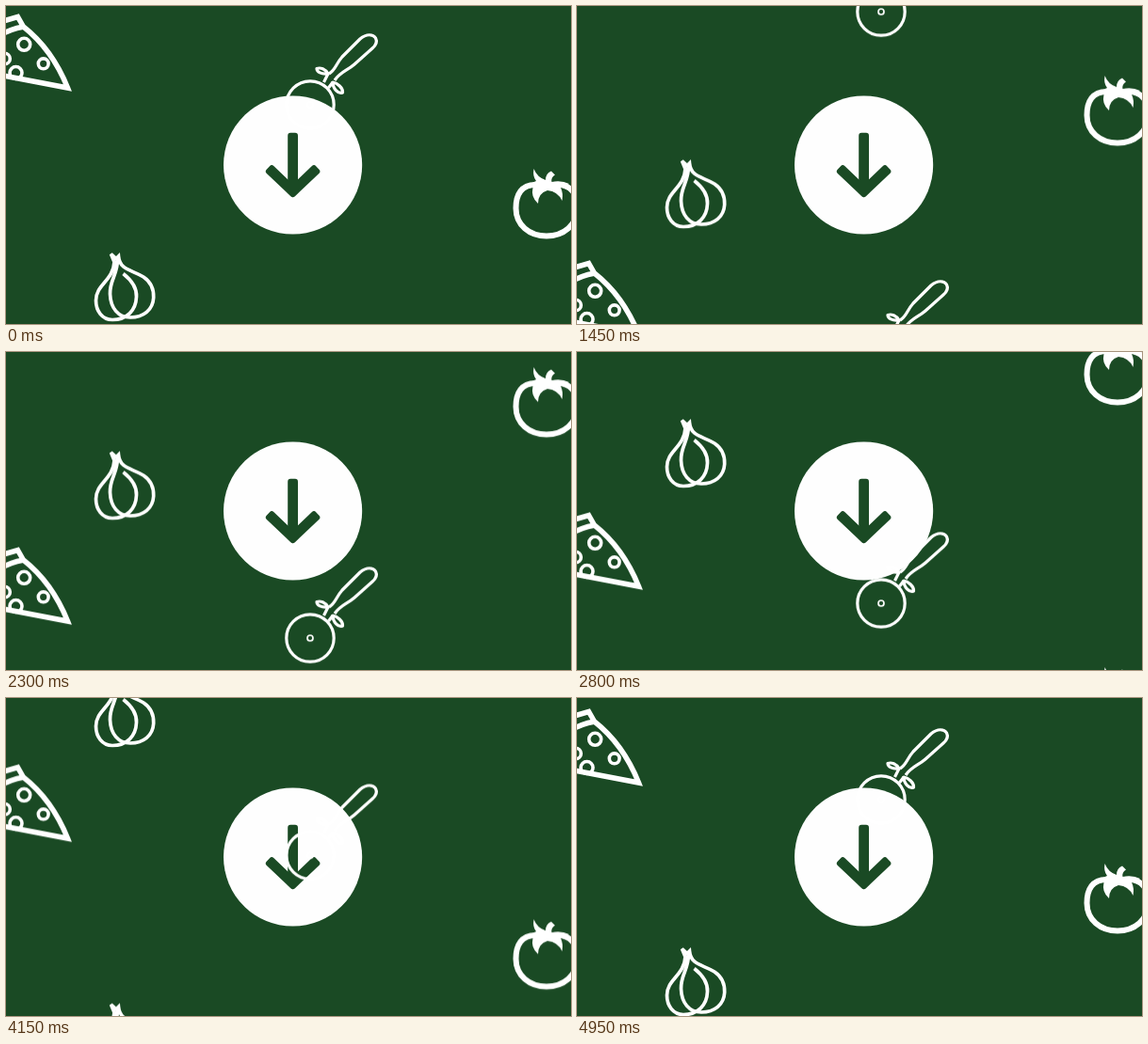
Animation, 600 px wide and 338 px high, one loop 5 s. Source, as an HTML page:

```html
<!DOCTYPE html>
<html lang="en">
<head>
<meta charset="utf-8">
<title>Scroll down</title>
<style>
  html, body { margin: 0; width: 100%; height: 100%; overflow: hidden; background: #1a4a24; }
  svg { display: block; width: 600px; height: 338px; }
  .line { fill: none; stroke: #fff; }
  .leaving { animation: leave 5s steps(100) infinite; }
  .arriving { animation: arrive 5s steps(100) infinite; }
  @keyframes leave { from { transform: translateY(0); } to { transform: translateY(-341px); } }
  @keyframes arrive { from { transform: translateY(369.3px); } to { transform: translateY(-0.7px); } }
</style>
</head>
<body>
<svg viewBox="0 0 600 338">
  <defs>
    <g id="pizza" class="line" stroke-width="5.5">
      <path d="M-8 17.500 L12.500 11.600 L18.500 22 Q49 46 65.500 87 L-8 73"/>
      <path d="M-8 32 Q4 24.500 19 22"/>
      <g stroke-width="3.6">
        <circle cx="19.200" cy="40.800" r="6.500"/>
        <circle cx="39.700" cy="61.300" r="5.400"/>
        <circle cx="10.500" cy="71" r="6.500"/>
        <circle cx="-1.500" cy="56" r="5.800"/>
      </g>
    </g>

    <g id="cutter" class="line" stroke-width="3.2" stroke-linejoin="round">
      <circle cx="323" cy="105" r="25.200"/>
      <circle cx="323" cy="105" r="3" stroke-width="1.700"/>
      <path d="M343 72 C350 68 350 62 357 54 L376 35 C383 29 390 30 392.500 34 C394.500 38 392.500 42 389 45 L370 62 C362 69 355 70 349 79"/>
      <path d="M342 72 C339 67 334 65 330 66.500 C330 70 335 73 342 72 Z"/>
      <path d="M347 81 C352 82 358 87 357.500 92 C353 94 347 88 347 81 Z"/>
      <path d="M342 72 L337.500 81 M347 81 L342.500 87"/>
    </g>

    <path id="garlic" class="line" stroke-width="3.7" d="M124.500 284.500 C134 292 139 300 138.500 309 C138 324 128 333.500 113 333.500 C102 333.500 95.500 324 95.500 313 C95.500 296 114 292 115 272 L111.500 263.500 L117 268.500 L119.500 266 C121 281 133 280 146 288 C155 294 157 302 156.700 310 C156 323 146 331 132 331 C119 331 111 321 110.500 306 C110 291 119 285 118.500 268"/>

    <g id="tomato">
      <path class="line" stroke-width="6" d="M564 190 C547 189 541.500 201 541.500 215 C541.500 233 556 244.500 574 244.500 C592 244.500 606.500 233 606.500 215 C606.500 201 601 190 586 190"/>
      <path fill="#fff" d="M560.500 173 Q564 182 573 185 Q573 178 579 175.500 L583 179.500 Q578.500 182 579.500 187 Q590 185 598 189 L589 193 Q592 199 590.500 207 Q586 197 575 196 Q565 199 565 210 Q557 203 559.500 193 L553 194 Q557 188 563 186 Q559 181 560.500 173 Z"/>
    </g>

    <g id="food">
      <use href="#pizza"/>
      <use href="#cutter"/>
      <use href="#garlic"/>
      <use href="#tomato"/>
    </g>

    <rect id="arm" y="-10.800" width="41.300" height="10.800" rx="3" transform="rotate(-43.500)"/>
  </defs>

  <rect width="600" height="338" fill="#1a4a24"/>
  <circle cx="304.600" cy="169" r="73.600" fill="#fefefe"/>
  <g fill="#1a4a24" transform="translate(304.600 204.300)">
    <rect x="-5.400" y="-69.500" width="10.800" height="62" rx="3"/>
    <use href="#arm"/>
    <use href="#arm" transform="scale(-1 1)"/>
  </g>
  <use class="leaving" href="#food"/>
  <use class="arriving" href="#food"/>
</svg>
</body>
</html>
```
